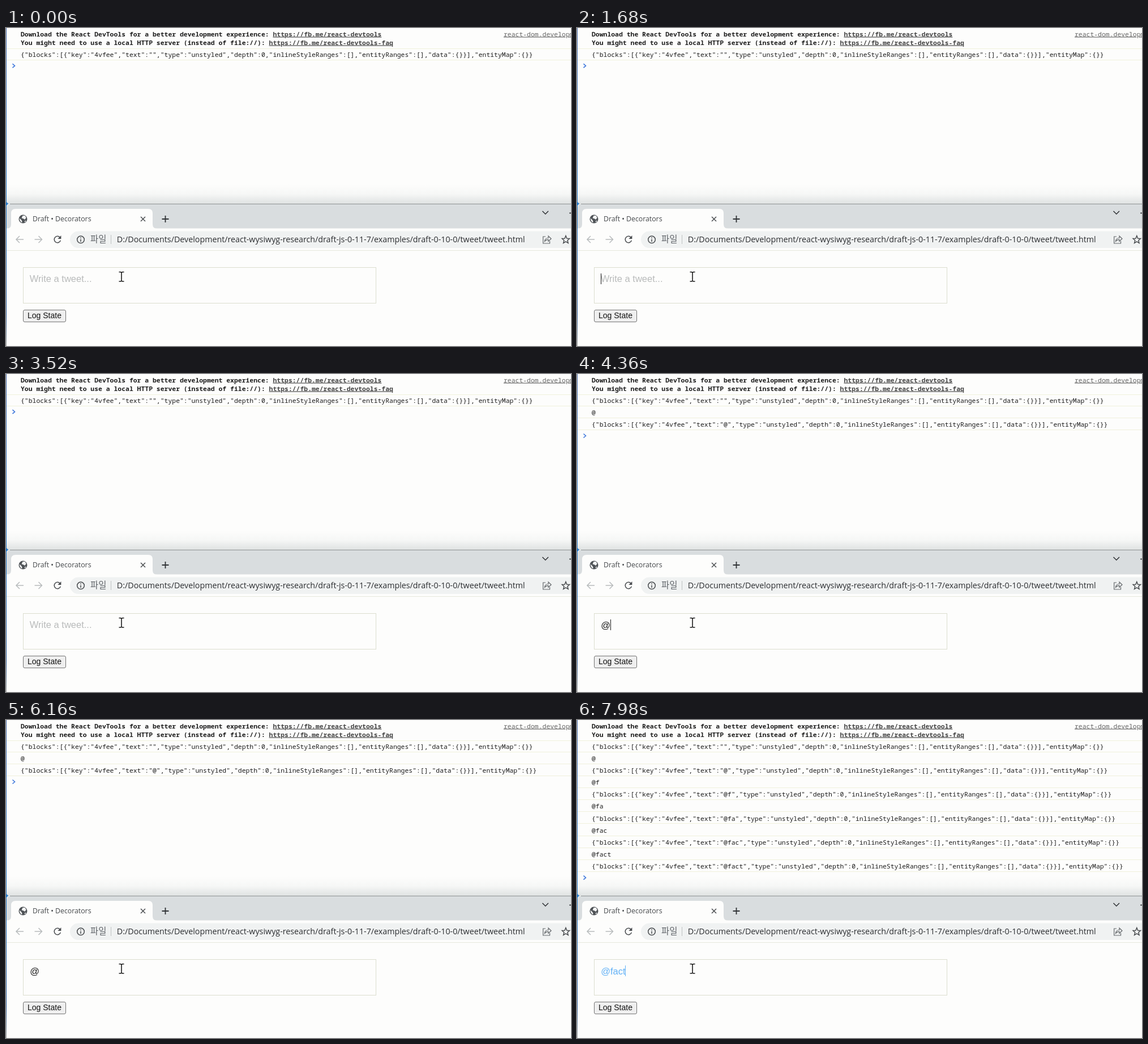
An HTML page that plays this animation: 998x561 px, repeating every 8000 ms.

```html
<!DOCTYPE html>
<html lang="en">
<head>
<meta charset="utf-8">
<title>Draft • Decorators</title>
<style>
  html, body { margin: 0; width: 100%; height: 100%; overflow: hidden; background: #fdfdfc; }
  svg { display: block; width: 998px; height: 561px; }
  text { white-space: pre; }
  .mono { font: 11.433px "Noto Sans Mono", "DejaVu Sans Mono", monospace; fill: #1c1c1c; }
  .bold { font-weight: bold; }
  .link { fill: #444; text-decoration: underline; }
  .ui { font-family: "Open Sans", "Noto Sans", sans-serif; }
  .arial { font-family: "Liberation Sans", sans-serif; }
  .line { fill: none; stroke: #4a4d50; stroke-width: 1.5; }
  .faded { stroke: #b9bcbd; }
  .rule { stroke: #f0f1dc; }
</style>
</head>
<body>
<svg viewBox="0 0 998 561">
  <defs>
    <linearGradient id="shade" x2="0" y2="1">
      <stop offset="0" stop-color="#fdfdfc"/>
      <stop offset=".5" stop-color="#f6f7f6"/>
      <stop offset="1" stop-color="#dfe2e2"/>
    </linearGradient>
    <linearGradient id="edge" x2="0" y2="1">
      <stop offset="0" stop-color="#4a6fb0"/>
      <stop offset=".55" stop-color="#2478c8"/>
      <stop offset=".9" stop-color="#2f5f9e"/>
      <stop offset="1" stop-color="#a9aaa6"/>
    </linearGradient>
  </defs>
  <rect width="998" height="561" fill="#fdfdfc"/>
  <rect y="276" width="998" height="34" fill="url(#shade)"/>

  <!-- console -->
  <text class="mono bold" x="26" y="14.5">Download the React DevTools for a better development experience: <tspan class="link">https://fb.me/react-devtools</tspan></text>
  <text class="mono bold" x="26" y="29.5">You might need to use a local HTTP server (instead of file://): <tspan class="link">https://fb.me/react-devtools-faq</tspan></text>
  <text class="mono link" x="879" y="14.5" style="fill:#666">react-dom.development.js</text>
  <path class="rule" d="M1 36.5H998"/>
  <g id="logs"></g>
  <path id="prompt" d="M11.5 -3.5L15.5 0L11.5 3.5" fill="none" stroke="#3f78dc" stroke-width="1.6"/>

  <!-- browser window -->
  <rect width="1" height="561" fill="url(#edge)"/>
  <path d="M0 304Q1 309 5 310Q1 311 0 317Z" fill="#2478c8"/>
  <path d="M1 354V318Q1 310 9 310H998V354Z" fill="#d9dddf"/>
  <path d="M7 310.5H998" stroke="#8f9494"/>
  <path d="M1 354Q9 354 9 346V327Q9 319 17 319H251Q259 319 259 327V346Q259 354 267 354Z" fill="#fdfdfc"/>
  <rect x="1" y="353.5" width="997" height="39" fill="#fdfdfc"/>
  <path d="M1 392.5H998" stroke="#e6e8dc"/>
  <circle cx="30" cy="337" r="7.5" fill="#505458"/>
  <path d="M23.8 335.5L27.5 339L28.5 341.5L28 343.2Q24 341.5 23.8 335.5ZM29.5 331H33.5L35.6 334.5L33.5 338L30 336L27.5 335.5ZM33 340H35.8L33 343Z" fill="#f4f5f5"/>
  <text class="ui" x="47" y="341" font-size="12.3" fill="#45484b">Draft • Decorators</text>
  <path class="line" d="M238 333L246 341M246 333L238 341"/>
  <path class="line" d="M275.5 337H287.5M281.5 331V343" style="stroke:#303336;stroke-width:1.8"/>
  <path class="line" d="M947.5 323L952.8 328.3L958 323M995 326.5H998" style="stroke:#303336"/>

  <path class="line faded" d="M31 373H18M24 367L18 373L24 379M50.5 373H63.5M57.5 367L63.5 373L57.5 379"/>
  <path class="line" d="M95.2 369.2A5.7 5.7 0 1 0 96.4 374.8"/>
  <path d="M97.4 366V372H91.4Z" fill="#4a4d50"/>
  <rect x="113" y="358.5" width="920" height="29.5" rx="14.75" fill="#f0f2f2"/>
  <circle class="line" cx="132" cy="373.3" r="6.3"/>
  <path class="line" d="M132 372.5V377M132 369.3V371"/>
  <text x="149" y="378.3" font-size="15.4" fill="#5f6368" style="font-family:'Noto Sans CJK KR','Noto Sans CJK',sans-serif">파일</text>
  <path d="M185.5 365V381" stroke="#bfc2c3"/>
  <text class="ui" x="195.8" y="378" font-size="14.27" fill="#2b2d30">D:/Documents/Development/react-wysiwyg-research/draft-js-0-11-7/examples/draft-0-10-0/tweet/tweet.html</text>
  <path class="line" d="M953 368H948.7V380H960.5V376M951.5 376.5Q952 370.5 958 370.5V367L963 371.8L958 376.3V373.3Q954 373 951.5 376.5Z" style="stroke:#65696c;stroke-width:1.2"/>
  <path class="line" d="M988.8 366.5L990.7 371.2L995.5 371.5L991.8 374.7L993 379.4L988.8 376.8L984.6 379.4L985.8 374.7L982.1 371.5L986.9 371.2Z"/>

  <!-- page -->
  <rect x="30.5" y="422.5" width="623" height="63" fill="none" stroke="#dcdecf"/>
  <text id="hint" class="arial" x="41.8" y="448" font-size="16.5" fill="#b9bbbb">Write a tweet...</text>
  <text id="typed" class="arial" x="42.2" y="448.5" font-size="16.5"></text>
  <rect id="caret" y="433" width="1" height="19"/>
  <rect x="30.5" y="497.5" width="75" height="21" rx="2.5" fill="#efefef" stroke="#747474"/>
  <text class="arial" x="38" y="512.2" font-size="14" fill="#111">Log State</text>
  <path d="M199.5 430.5H202.5L204 431.5L205.5 430.5H208.5M204 431V446.5M199.5 447H202.5L204 446L205.5 447H208.5" fill="none" stroke="#1c1c1c" stroke-width="1.6"/>
</svg>
<script>
  const LOOP = 8000, BLINK = 530, FIRST_BLINK = 440, ROW = 21.15;
  const HANDLE = '@fact';
  const KEY_TIMES = [4180, 6980, 7260, 7540, 7800];
  const byId = id => document.getElementById(id);
  const [logs, prompt, hint, typed, caret] =
    ['logs', 'prompt', 'hint', 'typed', 'caret'].map(byId);

  function svg(tag, attrs, parent) {
    const node = document.createElementNS(logs.namespaceURI, tag);
    for (const name in attrs) node.setAttribute(name, attrs[name]);
    return parent.appendChild(node);
  }

  const stateJson = text => JSON.stringify({
    blocks: [{ key: '4vfee', text, type: 'unstyled', depth: 0,
      inlineStyleRanges: [], entityRanges: [], data: {} }],
    entityMap: {}
  });

  const lines = [stateJson('')];
  for (let n = 1; n <= HANDLE.length; n++) {
    const text = HANDLE.slice(0, n);
    lines.push(text, stateJson(text));
  }
  const rows = lines.map((line, i) => {
    const row = svg('g', {}, logs);
    svg('text', { class: 'mono', x: 26, y: Math.round(50.7 + i * ROW) }, row).textContent = line;
    svg('path', { class: 'rule', d: `M1 ${Math.floor(56 + i * ROW) + .5}H998` }, row);
    return row;
  });

  function draw(t) {
    const count = KEY_TIMES.filter(key => key <= t).length;
    const blinkStart = count ? KEY_TIMES[count - 1] : FIRST_BLINK - 2 * BLINK;
    const caretOn = (t - blinkStart) % (2 * BLINK) < BLINK;
    const color = count > 1 ? '#62b1f6' : '#1a1a1a';

    rows.forEach((row, i) => row.style.display = i <= 2 * count ? '' : 'none');
    prompt.setAttribute('transform', `translate(0 ${66.7 + 2 * count * ROW})`);
    hint.style.display = count ? 'none' : '';
    typed.textContent = HANDLE.slice(0, count);
    typed.style.fill = caret.style.fill = color;
    const width = count ? typed.getComputedTextLength() : 0;
    caret.setAttribute('x', Math.round(42 + width));
    caret.style.display = caretOn ? '' : 'none';
  }

  const start = performance.now();
  function tick() {
    draw((performance.now() - start) % LOOP);
    requestAnimationFrame(tick);
  }
  tick();
</script>
</body>
</html>
```
